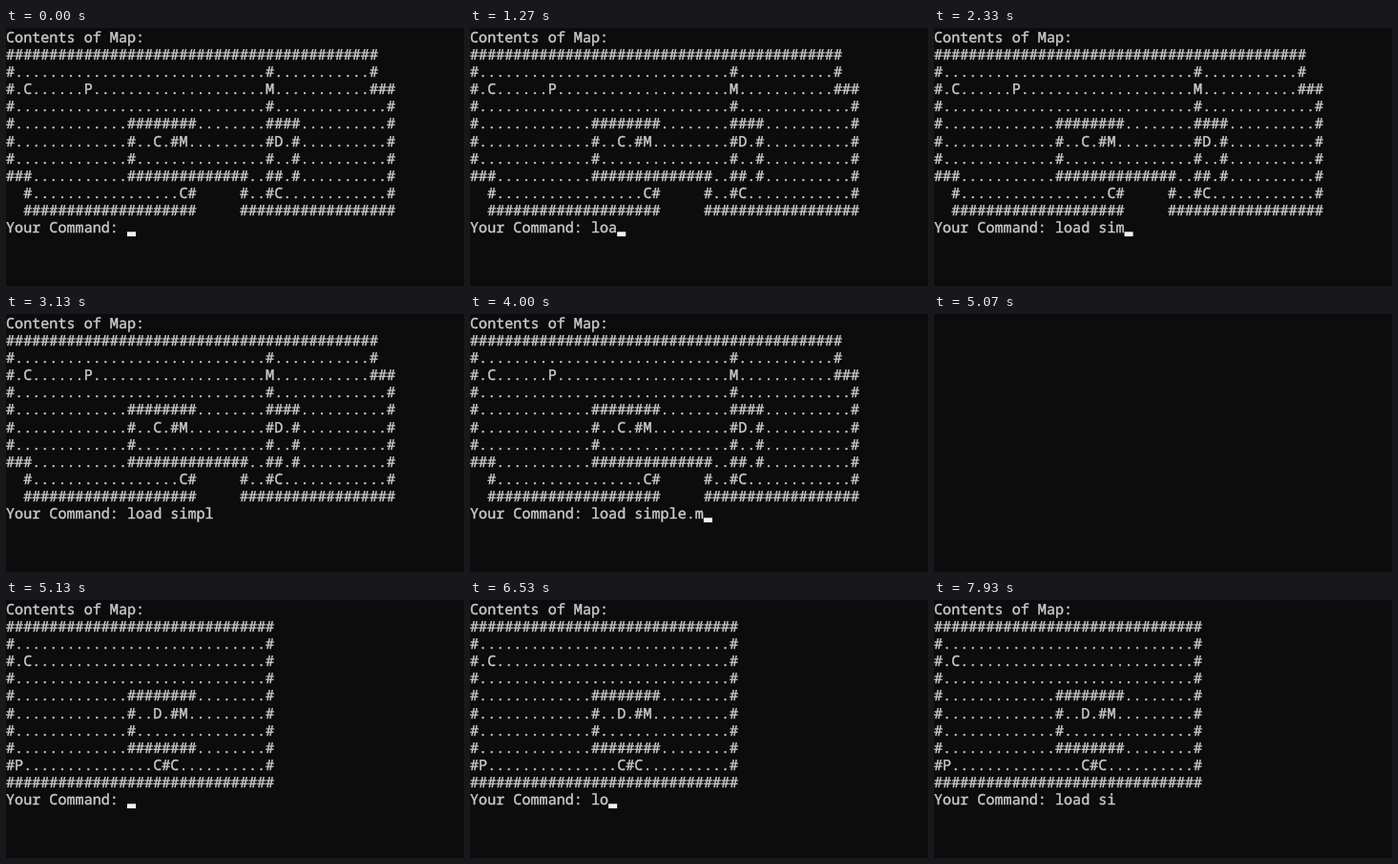
An HTML page with a canvas that plays this animation: 480 px wide and 270 px high, repeating every 8 s.

```html
<!DOCTYPE html>
<html lang="en">
<head>
<meta charset="utf-8">
<title>Map console</title>
<style>
  html, body { margin: 0; width: 100%; height: 100%; overflow: hidden; background: #0c0c0c; }
  canvas { display: block; width: 480px; height: 270px; }
</style>
</head>
<body>
<canvas id="screen" width="480" height="270"></canvas>
<script>
const ctx = document.getElementById('screen').getContext('2d');
const LOOP = 8000, CELL = 9.07, LINE = 18.17, BASE = 14.6;
const PROMPT = 'Your Command: ', PROMPT_ROW = 11;
const ENTER = 5000, CLEAR = 5070, REDRAW = 5130;

const d = n => '.'.repeat(n);
const h = n => '#'.repeat(n);
const s = n => ' '.repeat(n);

const bigMap = [
  h(43),
  `#${d(29)}#${d(11)}#`,
  `#.C${d(6)}P${d(20)}M${d(11)}###`,
  `#${d(29)}#${d(13)}#`,
  `#${d(13)}${h(8)}${d(8)}####${d(10)}#`,
  `#${d(13)}#..C.#M${d(9)}#D.#${d(10)}#`,
  `#${d(13)}#${d(15)}#..#${d(10)}#`,
  `###${d(11)}${h(14)}..##.#${d(10)}#`,
  `  #${d(17)}C#${s(5)}#..#C${d(12)}#`,
  `  ${h(20)}${s(5)}${h(18)}`
];
const smallMap = [
  h(31),
  `#${d(29)}#`,
  `#.C${d(27)}#`,
  `#${d(29)}#`,
  `#${d(13)}${h(8)}${d(8)}#`,
  `#${d(13)}#..D.#M${d(9)}#`,
  `#${d(13)}#${d(15)}#`,
  `#${d(13)}${h(8)}${d(8)}#`,
  `#P${d(15)}C#C${d(10)}#`,
  h(31)
];

// Each session: key press times, and times at which the cursor blinks off.
const COMMAND = 'load simple.map';
const first = {
  map: bigMap, start: 0,
  keys: [70, 670, 1130, 1330, 1600, 1730, 1930, 2200, 2600, 2870, 3200, 3600, 4000, 4330, 4530],
  off: [530, 1000, 1530, 2070, 3130, 3670, 4200, 4730]
};
const second = {
  map: smallMap, start: REDRAW,
  keys: [6070, 6530, 6670, 6930, 7130, 7600, 7870],
  off: [5800, 6330, 6870, 7330, 7930]
};

// A thin outline gives the console face its slightly heavier strokes.
function print(text, row) {
  const y = row * LINE + BASE;
  [...text].forEach((c, i) => {
    if (c === ' ') return;
    ctx.fillText(c, i * CELL, y);
    ctx.strokeText(c, i * CELL, y);
  });
}

function cursor(col, row) {
  ctx.fillStyle = '#f2f2f2';
  ctx.fillRect(col * CELL, row * LINE + 13.4, CELL, 4.8);
}

const latest = (times, t, from) => times.reduce((last, x) => x <= t ? x : last, from);

function draw(t) {
  ctx.fillStyle = '#0c0c0c';
  ctx.fillRect(0, 0, 480, 270);
  if (t >= CLEAR && t < REDRAW) return;

  const { map, start, keys, off } = t < CLEAR ? first : second;
  const typed = keys.filter(k => k <= t).length;
  ctx.fillStyle = ctx.strokeStyle = '#cccccc';
  ctx.lineWidth = 0.4;
  ctx.lineJoin = 'round';
  ctx.font = '15.12px "Noto Sans Mono", "DejaVu Sans Mono", monospace';
  ctx.textRendering = 'geometricPrecision';
  print('Contents of Map:', 0);
  map.forEach((line, i) => print(line, i + 1));
  print(PROMPT + COMMAND.slice(0, typed), PROMPT_ROW);

  if (t >= ENTER && t < CLEAR) cursor(0, PROMPT_ROW + 1);
  else if (latest(keys, t, start) >= latest(off, t, start)) cursor(PROMPT.length + typed, PROMPT_ROW);
}

function tick() {
  draw(performance.now() % LOOP);
  requestAnimationFrame(tick);
}
tick();
</script>
</body>
</html>
```
